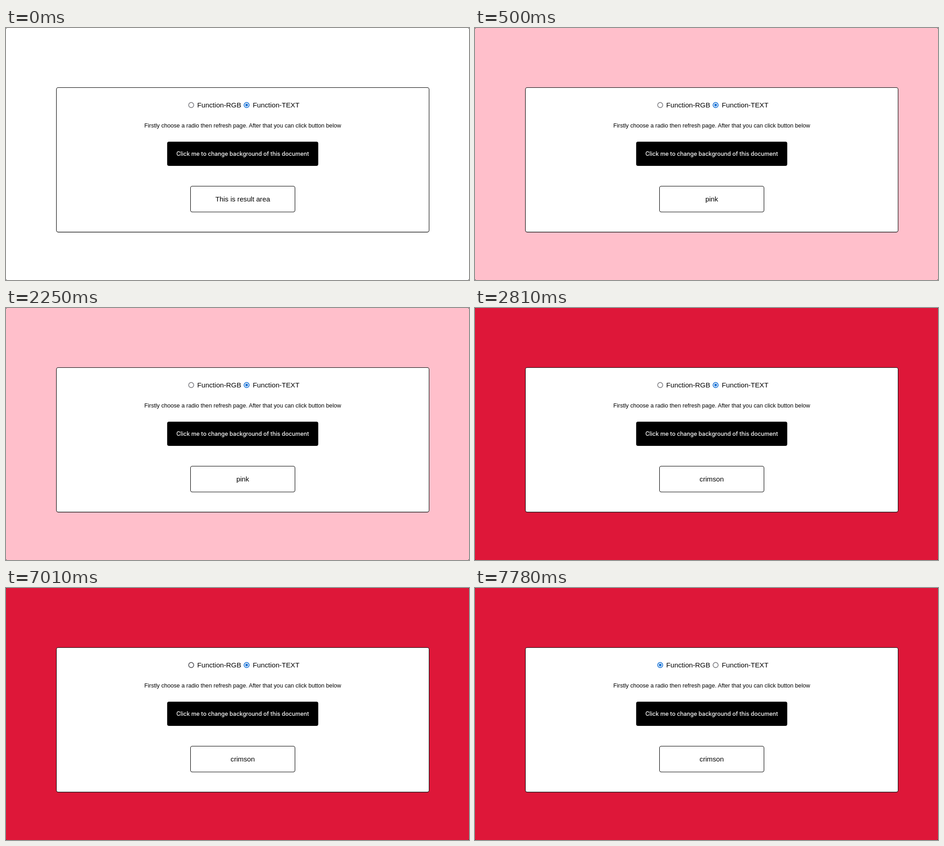
An HTML page for the animation above (8 s loop, 1015x552 px).

```html
<!DOCTYPE html>
<html lang="en">
<head>
<meta charset="utf-8">
<title>Background changer</title>
<style>
  html, body { margin: 0; width: 100%; height: 100%; overflow: hidden; }
  svg { display: block; width: 100vw; height: 100vh; }
  text { font: 15.2px "Liberation Sans", Arial, sans-serif; }
  .mid { text-anchor: middle; }
  .hint { font-size: 12.65px; }
  .label { font: 500 12.4px Inter, Roboto, sans-serif; fill: #fff; }
  .box { fill: #fff; stroke: #000; stroke-width: 1.05; }
  .ring { fill: #fff; stroke-width: 1.7; }
</style>
</head>
<body>
<svg viewBox="0 0 1015 552">
  <rect id="page" width="1015" height="552"/>
  <path d="M0 0h1.8L0 1.8zM1015 0v1.8L1013.2 0zM0 552v-1.8L1.8 552zM1015 552h-1.8L1015 550.2z" fill="#333"/>
  <rect class="box" x="110.5" y="130.4" width="817" height="316.7" rx="4"/>
  <g id="rgb" transform="translate(406 168.8)"><circle class="ring" r="5.6"/><circle class="dot" r="3"/></g>
  <text x="419.3" y="174">Function-RGB</text>
  <g id="word" transform="translate(527.5 168.8)"><circle class="ring" r="5.6"/><circle class="dot" r="3"/></g>
  <text x="541.1" y="174">Function-TEXT</text>
  <text class="mid hint" x="518.9" y="217.6">Firstly choose a radio then refresh page. After that you can click button below</text>
  <rect x="353.3" y="249.1" width="331.2" height="53" rx="4"/>
  <text class="mid label" x="518.9" y="280.3">Click me to change background of this document</text>
  <rect class="box" x="404.5" y="346.4" width="229" height="56.6" rx="4"/>
  <text class="mid" id="result" x="518.9" y="380"></text>
</svg>
<script>
  const LOOP = 8000;
  const GREY = '#818186', BLUE = '#1a74d6';
  const $ = id => document.getElementById(id);

  // Each step: start time, then the values it holds.
  const pages = [
    [0, '#fff', 'This is result area'],
    [500, '#ffbfcb', 'pink'],
    [1550, '#de1739', 'crimson'],
    [2250, '#ffbfcb', 'pink'],
    [2810, '#de1739', 'crimson']
  ];
  const HOVER = '#55555a';
  const pointer = [
    [0, GREY],
    [5610, HOVER],
    [5680, GREY],
    [7010, HOVER],
    [7220, '#909094'],
    [7360, '#1260bd'],
    [7780, BLUE]
  ];

  const at = (steps, t) => steps.filter(s => s[0] <= t).pop();

  function setRadio(id, colour, on) {
    const [ring, dot] = $(id).children;
    ring.setAttribute('stroke', colour);
    dot.setAttribute('fill', on ? colour : 'none');
  }

  function draw(now) {
    const t = Math.max(0, now) % LOOP;
    const [, colour, name] = at(pages, t);
    const swapped = t >= 7360;
    $('page').setAttribute('fill', colour);
    $('result').textContent = name;
    setRadio('rgb', at(pointer, t)[1], swapped);
    setRadio('word', swapped ? GREY : BLUE, !swapped);
  }

  const start = performance.now();
  function tick() {
    draw(performance.now() - start);
    requestAnimationFrame(tick);
  }
  tick();
</script>
</body>
</html>
```
